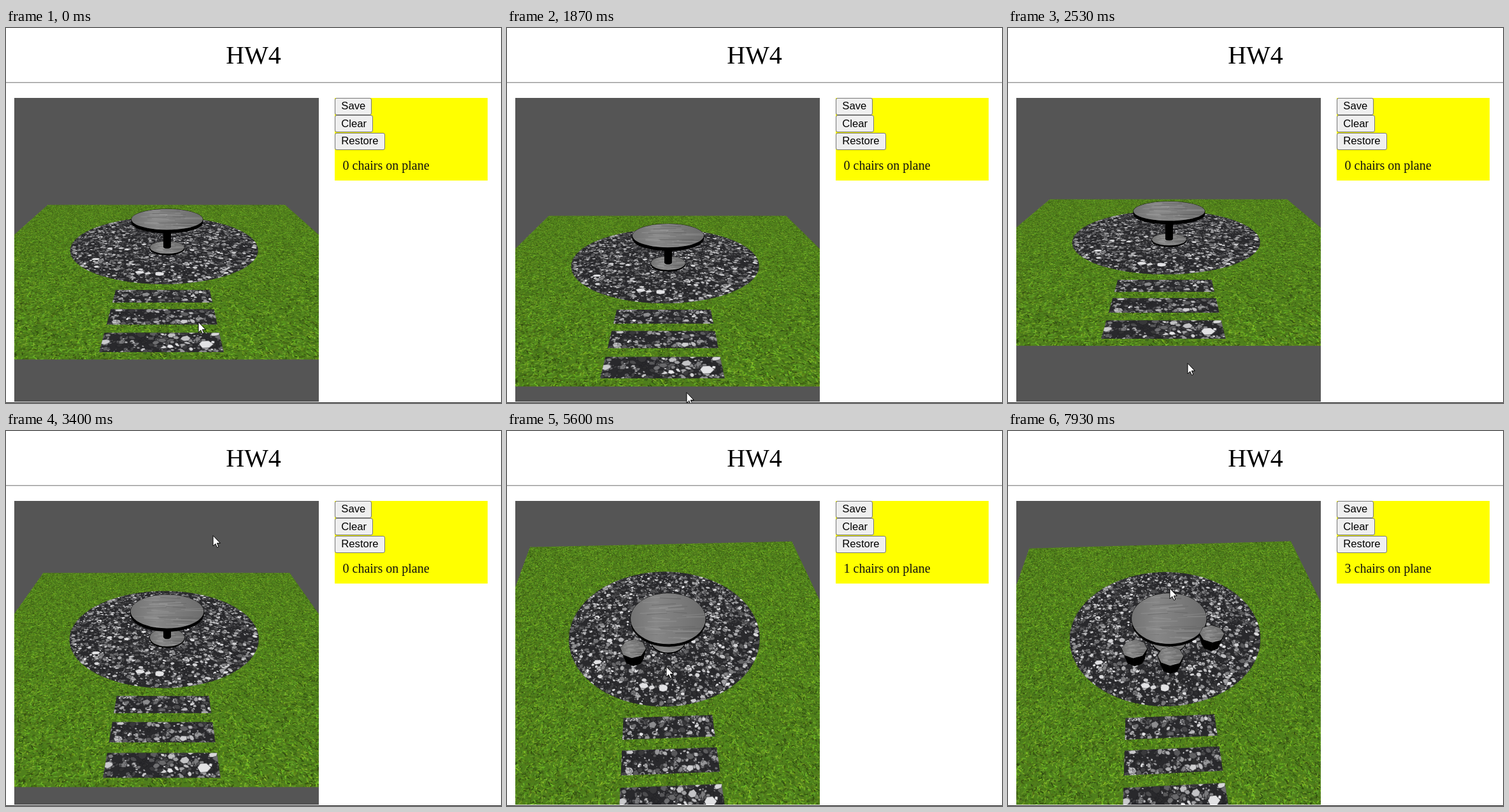
An HTML page with a canvas for the animation above (8 s loop, 777 by 590 pixels).

```html
<!DOCTYPE html>
<html lang="en">
<head>
<meta charset="utf-8">
<title>HW4</title>
<style>
  html, body { margin: 0; width: 100%; height: 100%; overflow: hidden; background: #fff; }
  canvas { position: absolute; left: 13px; top: 110px; }
  svg { position: absolute; left: 0; top: 0; }
  .serif { font-family: "Liberation Serif", "Times New Roman", serif; }
  .sans { font: 16.67px "Liberation Sans", Arial, sans-serif; }
</style>
</head>
<body>
<canvas id="view" width="478" height="478"></canvas>
<svg width="777" height="590" viewBox="0 0 777 590">
  <text class="serif" x="388.5" y="56" font-size="40" text-anchor="middle">HW4</text>
  <path d="M0 85.5H777" stroke="#9a9a9a"/>
  <path d="M0 86.5H777" stroke="#cfcfcf"/>
  <path d="M0 589.5H777" stroke="#222"/>
  <rect x="516" y="110" width="240" height="130" fill="#ff0"/>
  <g id="buttons" class="sans"></g>
  <text id="count" class="serif" x="528.5" y="223" font-size="20" fill="#111"></text>
  <path id="cursor" d="M.5 .5V17L4.3 13.4 6.9 19.2 9.3 18.2 6.8 12.4H11.8Z" fill="#fff" stroke="#000"/>
</svg>
<script>
const $ = id => document.getElementById(id);
const LOOP = 8000, STEP = 1000 / 15;
const SIZE = 478, MID = SIZE / 2;

let seed = 20;
function rnd() {
  seed = seed + 0x6D2B79F5 | 0;
  let n = Math.imul(seed ^ seed >>> 15, 1 | seed);
  n = n + Math.imul(n ^ n >>> 7, 61 | n) ^ n;
  return ((n ^ n >>> 14) >>> 0) / 4294967296;
}
const between = (a, b) => a + (b - a) * rnd();
const clamp = (v, a, b) => Math.min(b, Math.max(a, v));

// Lengths are in radii of the paved circle; z grows toward the viewer.
const GROUND = { x: 1.765, back: -1.62, front: 2.007 };
const SLAB = { first: 1.104, gap: 0.3105, depth: 0.211, left: -0.418, width: 0.772 };
const RES = 280;
const TW = Math.round(GROUND.x * 2 * RES);
const TH = Math.round((GROUND.front - GROUND.back) * RES);

function pebble(c, x, z, r, shade) {
  const turn = rnd() * Math.PI, flat = between(0.55, 1), sides = 5 + Math.floor(rnd() * 4);
  c.beginPath();
  for (let i = 0; i < sides; i++) {
    const a = i / sides * 2 * Math.PI, q = r * between(0.8, 1.15);
    const px = Math.cos(a) * q, py = Math.sin(a) * q * flat;
    c.lineTo(x + px * Math.cos(turn) - py * Math.sin(turn), z + px * Math.sin(turn) + py * Math.cos(turn));
  }
  c.closePath();
  c.fillStyle = `rgb(${shade},${shade},${shade + 2})`;
  c.fill();
  c.stroke();
}

function makeTexture() {
  const el = document.createElement("canvas");
  el.width = TW;
  el.height = TH;
  const c = el.getContext("2d", { willReadFrequently: true });
  c.fillStyle = "#4f7f1c";
  c.fillRect(0, 0, TW, TH);
  c.lineWidth = 2;
  for (let i = 0; i < 55000; i++) {
    const x = rnd() * TW, y = rnd() * TH, a = rnd() * Math.PI, l = between(3, 9);
    c.strokeStyle = `hsl(${between(79, 94)},${between(56, 72)}%,${between(16, 47)}%)`;
    c.beginPath();
    c.moveTo(x, y);
    c.lineTo(x + Math.cos(a) * l, y + Math.sin(a) * l);
    c.stroke();
  }
  c.setTransform(RES, 0, 0, RES, GROUND.x * RES, -GROUND.back * RES);
  c.beginPath();
  c.arc(-0.025, 0, 1, 0, 7);
  for (let i = 0; i < 3; i++) c.rect(SLAB.left, SLAB.first + i * SLAB.gap, SLAB.width, SLAB.depth);
  c.clip();
  c.fillStyle = "#29292c";
  c.fillRect(-2, -2, 4, 5);
  c.strokeStyle = "rgba(28,28,31,.55)";
  c.lineWidth = 0.005;
  for (let i = 0; i < 9000; i++) {
    pebble(c, between(-1.05, 1), between(-1, 1.95), 0.009 + 0.027 * rnd() ** 2.5,
      Math.round(42 + 195 * rnd() ** 1.45));
  }
  const big = [[-0.063, 0.79], [-0.24, 0.76], [-0.69, 0.45], [0.25, 1.853]];
  for (const [x, z] of big) pebble(c, x, z, 0.045, 226);
  return new Uint32Array(c.getImageData(0, 0, TW, TH).data.buffer);
}

// Waypoints of the pointer: arrival, x, y, departure.
const POINTER = [
  [0, 302, 462], [200, 314, 398], [470, 257, 430], [867, 288, 527], [1000, 282, 549, 1333],
  [1767, 282, 573, 2067], [2533, 282, 527, 2600], [2933, 322, 209], [3133, 323, 138, 3210],
  [3300, 323, 154], [3500, 326, 173, 3800], [4000, 231, 332], [4200, 203, 388],
  [4667, 199, 357, 4800], [5200, 236, 375], [5733, 254, 368, 5800], [6333, 311, 348, 6400],
  [6733, 307, 338, 6800], [7667, 261, 259], [7933, 254, 247]];

function pointer(t) {
  const next = POINTER.findIndex(p => p[0] > t);
  if (next < 0) return POINTER[POINTER.length - 1].slice(1, 3);
  const [t0, x0, y0, leave = t0] = POINTER[next - 1], [t1, x1, y1] = POINTER[next];
  const f = Math.max(0, (t - leave) / (t1 - leave));
  return [x0 + (x1 - x0) * f, y0 + (y1 - y0) * f];
}

// The camera orbits a pivot; drags reach it slightly late.
const FOCAL = 600, DIST = 4.03, PIVOT = { y: -0.156, z: 0.216 };
const LAG = 100, PAN_DRAG = [1333, 2600], ORBIT_DRAGS = [[3210, 3500], [5867, 5875]];
const PER_PIXEL = 2 * Math.PI / SIZE;

function dragged(t, [from, to]) {
  const a = pointer(from), b = pointer(clamp(t - LAG, from, to));
  return [b[0] - a[0], b[1] - a[1]];
}

function cameraAt(t) {
  const pan = (22 + dragged(t, PAN_DRAG)[1]) / 147;
  let pitch = 0.376, yaw = 0;
  for (const span of ORBIT_DRAGS) {
    const [dx, dy] = dragged(t, span);
    yaw += dx * PER_PIXEL;
    pitch += dy * PER_PIXEL;
  }
  const sin = Math.sin(pitch), cos = Math.cos(pitch);
  return { sin, cos, yaw, y: PIVOT.y + DIST * sin + pan * cos, z: PIVOT.z + DIST * cos - pan * sin };
}

function project(cam, x, y, z) {
  const rx = x + cam.yaw * (z - PIVOT.z), dz = cam.z - z + cam.yaw * x, dy = cam.y - y;
  const depth = dy * cam.sin + dz * cam.cos;
  return [MID + FOCAL * rx / depth, MID + FOCAL * (dy * cam.cos - dz * cam.sin) / depth];
}

const texture = makeTexture();
const view = $("view").getContext("2d");
const image = view.createImageData(SIZE, SIZE);
const pixels = new Uint32Array(image.data.buffer);
const GREY = 0xff555555;

function drawGround(cam) {
  const { sin, cos, yaw } = cam;
  const depth = cam.y * sin + cam.z * cos;
  const horizon = MID - FOCAL * sin / cos;
  for (let y = 0; y < SIZE; y++) {
    const rows = [0, 1, 2, 3].map(i => cam.y * FOCAL / cos / (y + 0.125 + i / 4 - horizon));
    for (let x = 0; x < SIZE; x++) {
      let r = 0, g = 0, b = 0;
      for (let i = 0; i < 4; i++) {
        const d = rows[i];
        let p = GREY;
        if (d > 0) {
          const z = (depth - d) / cos - PIVOT.z;
          const s = (x + 0.25 + (i & 1) * 0.5 - MID) * d / FOCAL;
          const tx = Math.floor((s - yaw * z + GROUND.x) * RES);
          const tz = Math.floor((z + yaw * s + PIVOT.z - GROUND.back) * RES);
          if (tx >= 0 && tx < TW && tz >= 0 && tz < TH) p = texture[tz * TW + tx];
        }
        r += p & 255;
        g += p >> 8 & 255;
        b += p >> 16 & 255;
      }
      pixels[y * SIZE + x] = 0xff000000 | b >> 2 << 16 | g >> 2 << 8 | r >> 2;
    }
  }
  view.putImageData(image, 0, 0);
}

const STREAKS = Array.from({ length: 36 }, () => ({
  x: between(-1, 0.5), z: between(-1, 1), length: between(0.4, 1), tilt: between(-0.08, 0.08),
  width: between(0.8, 2.4), color: rnd() < 0.6 ? "rgba(165,165,165,.3)" : "rgba(80,80,80,.3)"
}));

function outline(points) {
  view.beginPath();
  for (const p of points) view.lineTo(...p);
  view.closePath();
}

// A black-sided drum with a grey stone face.
function drum(cam, { x, z, low, high, r, foot = r, sides = 48 }) {
  const ring = (y, radius) => Array.from({ length: sides }, (_, i) => {
    const a = (i + 0.1) / sides * 2 * Math.PI;
    return project(cam, x + radius * Math.cos(a), y, z + radius * Math.sin(a));
  });
  const top = ring(high, r), bottom = ring(low, foot);
  view.fillStyle = view.strokeStyle = "#000";
  view.lineWidth = 0.6;
  top.forEach((p, i) => {
    const j = (i + 1) % sides;
    outline([p, top[j], bottom[j], bottom[i]]);
    view.fill();
    view.stroke();
  });
  const shade = view.createLinearGradient(...project(cam, x - r, high, z), ...project(cam, x + r, high, z));
  ["#727272", "#868686", "#7a7a7a", "#6c6c6c"].forEach((c, i) => shade.addColorStop(i / 3, c));
  outline(top);
  view.fillStyle = shade;
  view.fill();
  view.save();
  view.clip();
  for (const s of STREAKS) {
    view.beginPath();
    view.moveTo(...project(cam, x + s.x * r, high, z + s.z * r));
    view.lineTo(...project(cam, x + (s.x + s.length) * r, high, z + (s.z + s.tilt) * r));
    view.lineWidth = s.width;
    view.strokeStyle = s.color;
    view.stroke();
  }
  view.restore();
}

const TABLE = [
  { low: 0.012, high: 0.028, r: 0.178 },
  { low: 0.028, high: 0.31, r: 0.033 },
  { low: 0.307, high: 0.34, r: 0.359 }
].map(part => ({ x: 0.006, z: 0.2, ...part }));

const CHAIRS = [[-0.337, 0.424], [0.003, 0.534], [0.4275, 0.259]]
  .map(([x, z]) => ({ x, z, low: 0, high: 0.15, r: 0.121, foot: 0.09, sides: 8 }));

$("buttons").innerHTML = [["Save", 57], ["Clear", 59], ["Restore", 78]].map(([name, w], i) =>
  `<rect x="516.5" y="${Math.floor(110 + 27.5 * i) + 0.5}" width="${w}" height="26" rx="2.5"
    fill="#efefef" stroke="#767676"/><text x="526.3" y="${Math.round(128 + 27.5 * i)}">${name}</text>`).join("");

let drawn = "";
function render(time) {
  const t = Math.floor((time % LOOP + 3.5) / STEP) * STEP + 0.5;
  const cam = cameraAt(t);
  const count = clamp(Math.floor((t - 3866) / 1000), 0, CHAIRS.length);
  const key = Object.values(cam).join() + count;
  if (key !== drawn) {
    drawn = key;
    drawGround(cam);
    for (const part of [...TABLE, ...CHAIRS.slice(0, count)]) drum(cam, part);
    $("count").textContent = `${count} chairs on plane`;
  }
  const [x, y] = pointer(t).map(Math.round);
  $("cursor").setAttribute("transform", `translate(${x - 0.5} ${y})`);
}

const began = performance.now();
function tick() {
  render(performance.now() - began);
  requestAnimationFrame(tick);
}
tick();
</script>
</body>
</html>
```
